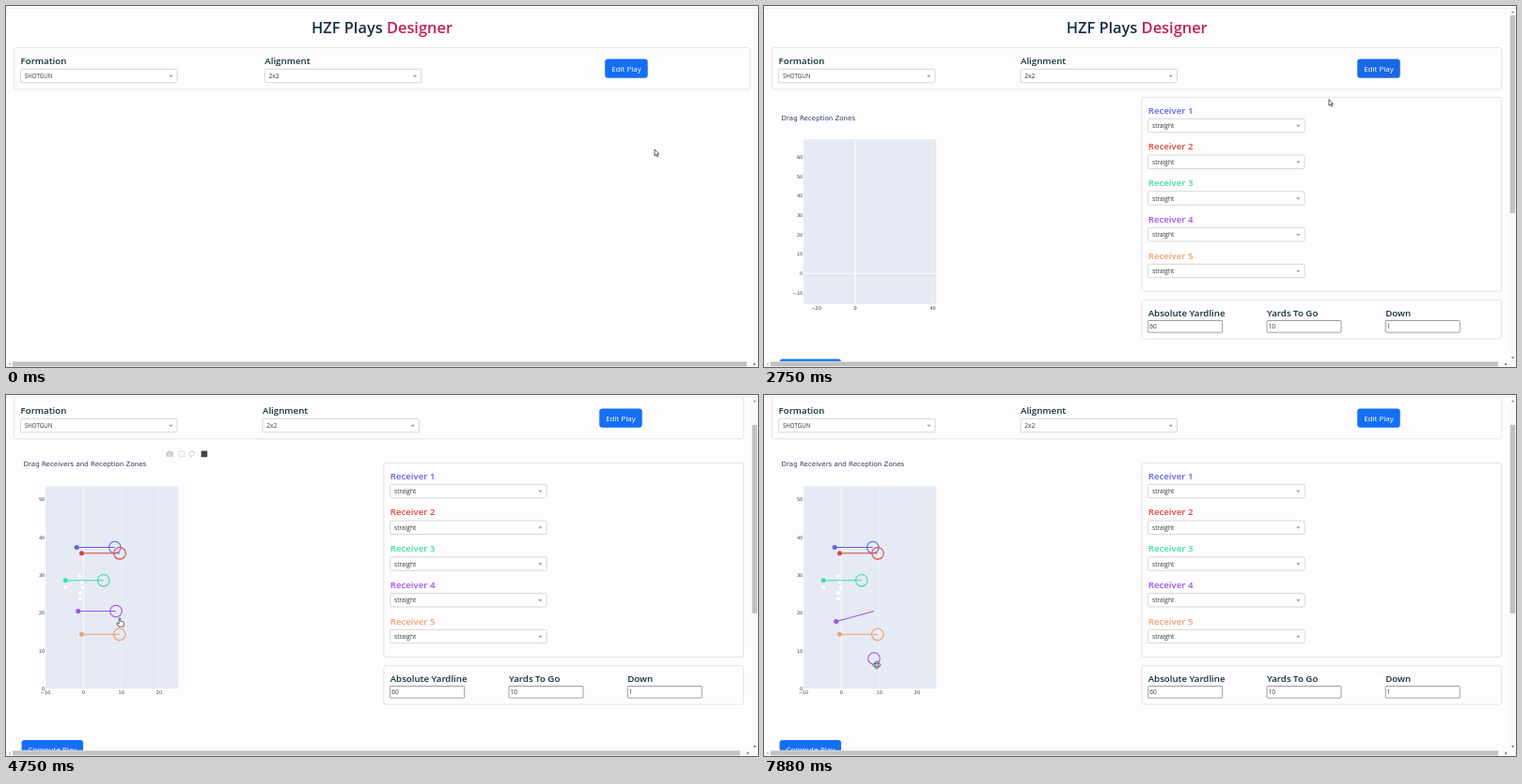
Animation, 800 px wide and 385 px high, one loop 8000 ms. Source, as an HTML page:

```html
<!DOCTYPE html>
<html lang="en">
<head>
<meta charset="utf-8">
<title>Plays Designer</title>
<style>
  html, body { margin: 0; width: 100%; height: 100%; overflow: hidden; background: #fefcfe; }
  svg { display: block; width: 800px; height: 385px; }
  text { font: 6.6px "Open Sans", "Noto Sans", sans-serif; fill: #333; }
  .title { font-size: 16.4px; font-weight: 600; fill: #14303f; text-anchor: middle; }
  .label { font-size: 9.7px; font-weight: 600; fill: #10303a; }
  .button { font-size: 8px; fill: #fff; text-anchor: middle; }
  .heading { font: 7.08px "DejaVu Sans", sans-serif; fill: #2a3f5f; }
  .tick { font: 5px "DejaVu Sans", sans-serif; fill: #2a3f5f; text-anchor: middle; }
  .end { text-anchor: end; }
</style>
</head>
<body>
<svg id="stage" viewBox="0 0 800 385"></svg>
<script>
const BLUE = '#156ff5', HOVER = '#1a5dc4';
const STEP = 125, LOOP = 8000;

// Receivers: colour, start x, y and route end x, in page coordinates
const receivers = [
  ['#6264dc', 75.2, 204.5, 115.8],
  ['#d8463f', 80.5, 210.8, 121],
  ['#3be0a0', 63.2, 239.8, 103.8],
  ['#9a52e8', 76.8, 272.5, 117],
  ['#f0a070', 80.5, 297.3, 120.8]
];
const linemen = [[78.5, 235.2], [80.5, 241], [63.2, 247], [81.5, 247.5], [79, 253], [79, 259.3]];

const text = (x, y, s, cls = '', style = '') => `<text x="${x}" y="${y}" class="${cls}" style="${style}">${s}</text>`;
const rect = (x, y, w, h, attrs) => `<rect x="${x}" y="${y}" width="${w}" height="${h}" ${attrs}/>`;
const line = (x1, y1, x2, y2, attrs) => `<path d="M${x1} ${y1}L${x2} ${y2}" ${attrs}/>`;
const path = (d, attrs) => `<path d="${d}" ${attrs}/>`;
const card = (x, y, w, h) => rect(x, y, w, h, 'rx="2.5" fill="none" stroke="#dfdde0" stroke-width=".8"');
const button = (x, y, w, s, cls) =>
  rect(x, y, w, 20.4, `rx="3.2" fill="${BLUE}" class="${cls}"`) + text(x + w / 2, y + 13.2, s, 'button');

const field = (x, y, label, value, color = '#10303a') =>
  text(x, y, label, 'label', `fill:${color}`) +
  rect(x, y + 5.8, 166.5, 14.4, 'rx="1.5" fill="#fff" stroke="#ccc" stroke-width=".8"') +
  text(x + 4.3, y + 15.5, value, '', `font-size:${value === 'SHOTGUN' ? 6.2 : 6.6}px`) +
  path(`M${x + 157.5} ${y + 12.2}h4.4l-2.2 2.2z`, 'fill="#999"');

const input = (x, label, value) =>
  text(x, 330.5, label, 'label') +
  rect(x, 335.5, 79, 12.6, 'rx=".8" fill="#fff" stroke="#767676" stroke-width=".7"') +
  text(x + 1.6, 344.4, value);

const header = (mid, width, alignX, buttonX) =>
  text(mid, 28.5, 'HZF Plays <tspan fill="#c01f52">Designer</tspan>', 'title') +
  card(8.5, 44.4, width, 44.4) +
  field(15.6, 61.5, 'Formation', 'SHOTGUN') + field(alignX, 61.5, 'Alignment', '2x2') +
  button(buttonX, 56.4, 45.5, 'Edit Play', 'edit');

const minus = n => String(n).replace('-', '\u2212');

// Plot area with ticks every `dx` and `dy`; (x0, y0) is the zero point and k the scale
function plot(top, bottom, x0, y0, k, xs, ys, heading, headingY) {
  const grid = x => line(x0 + x * k, top, x0 + x * k, bottom, `stroke="#fff" stroke-width="${x ? .5 : 1}" opacity="${x ? .6 : .9}"`);
  return text(18.5, headingY, heading, 'heading') +
    rect(42, top, 141.3, bottom - top, 'fill="#e5eaf5"') +
    xs.map(x => grid(x) + text(x0 + x * k, bottom + 6, minus(x), 'tick')).join('') +
    ys.map(y => text(41.3, y0 - y * k + 1.8, minus(y), 'tick end')).join('');
}

const emptyPlot = plot(142.4, 317.8, 97, 285.2, 2.065, [-20, 0, 40], [-10, 0, 10, 20, 30, 40, 50, 60],
  'Drag Reception Zones', 122) + line(42, 285.2, 183.3, 285.2, 'stroke="#fff" opacity=".8"');

const routes = receivers.map(([color, x, y, end], i) =>
  line(x, y, end, y, `id="route${i}" stroke="${color}" stroke-width="1.1"`) +
  `<circle id="start${i}" cx="${x}" cy="${y}" r="2.5" fill="${color}"/>` +
  `<circle id="zone${i}" cx="${end}" cy="${y}" r="6.3" fill="none" stroke="${color}" stroke-width="1.1"/>`).join('');

const toolbar = `<g id="toolbar" fill="none" stroke="#c4c5c9" stroke-width=".9">` +
  path('M170.6 102.8h1.8l.8-1.2h2l.8 1.2h1.8v5h-7.2z', 'fill="#c4c5c9" stroke="none"') +
  '<circle cx="174.2" cy="105.2" r="1.4" stroke="#fefcfe" stroke-width=".7"/>' +
  rect(184.2, 102, 5.6, 5.6, 'stroke-dasharray="1.3 .8"') +
  path('M195.2 106.4c-1.4-2 .2-4.4 2.6-4.4s3.4 2 2.2 3.8-3 1.8-4.2.8l.2 1.8', '') +
  rect(207.6, 101.6, 6.6, 6.6, 'fill="#444" stroke="none"') + '</g>';

const fullPlot = plot(139.2, 355.2, 82.3, 355.2, 4.035, [-10, 0, 10, 20], [0, 10, 20, 30, 40, 50],
  'Drag Receivers and Reception Zones', 118.4) +
  linemen.map(([x, y]) => `<circle cx="${x}" cy="${y}" r="2" fill="#fff"/>`).join('') + routes + toolbar;

const side = card(401.8, 97.4, 382.8, 207.2) +
  receivers.map(([color], i) => field(408.7, 114.5 + 38.75 * i, `Receiver ${i + 1}`, 'straight', color)).join('') +
  card(401.8, 313.6, 382.8, 41.4) +
  input(408.7, 'Absolute Yardline', 60) + input(535, 'Yards To Go', 10) + input(661.2, 'Down', 1);

const outline = 'fill="#fff" stroke="#222" stroke-width=".7" stroke-linejoin="round"';
const cursors = {
  arrow: path('M0 0V6.8L1.6 5.4L2.7 7.8L3.7 7.3L2.6 5H4.6z', outline),
  hand: path('M-.8 .7Q0-.5 .8 .7V3.8L4 4.6Q4.8 5 4.6 6L3.8 9.6H-1L-3.2 6.2Q-2.6 5-.8 6.4z', outline),
  move: path('M0-4.4L1.8-2.4H.8V-.8H2.4V-1.8L4.4 0L2.4 1.8V.8H.8V2.4H1.8L0 4.4L-1.8 2.4H-.8V.8H-2.4V1.8L-4.4 0L-2.4-1.8V-.8H-.8V-2.4H-1.8z', outline)
};

const stage = document.getElementById('stage');
stage.innerHTML =
  rect(0, 0, 800, 385, 'fill="#fefcfe"') +
  `<g id="page"><g id="before">${header(400, 783, 275.3, 637.2)}</g>
   <g id="after">${header(396.7, 776.2, 273, 631.2)}
     <g id="side">${side}</g><g id="empty">${emptyPlot}</g><g id="full">${fullPlot}</g>
     <g id="compute">${button(16.6, 410, 65.5, 'Compute Play', '')}</g></g></g>` +
  rect(0, 0, 800, 2, 'fill="#fff"') + rect(0, 2, 800, .8, 'fill="#ebe9ec"') +
  rect(0, 378.8, 800, 6.2, 'fill="#fbf9fb"') +
  path('M4.6 380.6v3l-1.8-1.5z', 'fill="#aaa"') +
  rect(7, 379.4, 781, 5, 'id="across" fill="#c1c1c1"') +
  path('M0 380.6v3l1.8-1.5z', 'id="right" fill="#444"') +
  '<g id="vertical">' + rect(793, 2.8, 7, 376, 'fill="#fbf9fb"') +
  path('M795 7.2h3l-1.5-1.8z', 'fill="#777"') + path('M795 374.2h3l-1.5 1.8z', 'fill="#444"') +
  rect(793.7, 10, 5.4, 201, 'id="down" fill="#c1c1c1"') + '</g>' +
  '<g id="cursor">' + Object.entries(cursors).map(([k, d]) => `<g id="${k}">${d}</g>`).join('') + '</g>';

const el = id => document.getElementById(id);
const set = (id, name, value) => el(id).setAttribute(name, value);
const show = (id, on) => set(id, 'display', on ? 'inline' : 'none');
const shift = (id, x, y) => set(id, 'transform', `translate(${x} ${y})`);

// Linear interpolation over [time, value...] keys
function track(keys, t) {
  const i = keys.findIndex(k => k[0] > t);
  if (i === 0) return keys[0].slice(1);
  if (i < 0) return keys[keys.length - 1].slice(1);
  const a = keys[i - 1], b = keys[i], u = (t - a[0]) / (b[0] - a[0]);
  return a.slice(1).map((v, n) => v + (b[n + 1] - v) * u);
}

const pointer = [
  [0, 690, 153], [375, 672, 205], [875, 655, 150], [1000, 655, 114], [1750, 666, 84], [1875, 664.5, 68.5],
  [2500, 664.5, 68.5], [2750, 601, 99.5], [3375, 271.5, 160.5], [3875, 172, 247.5], [4250, 160, 245],
  [5250, 82, 230], [5500, 82, 232], [5625, 82, 241], [6000, 82, 252], [6250, 82, 252],
  [6750, 120, 237.5], [7000, 120, 237.5], [7875, 120, 288]
];
const scrolling = [[3250, 0], [3375, 15], [3500, 42]];
const startDrag = [[5625, 272.5], [6000, 283.5]];
const zoneDrag = [[7000, 272.5], [7875, 323]];
const toolbarFade = [[3375, 0], [3675, 1], [5375, 1], [5675, 0], [6125, 0], [6425, 1], [7000, 1], [7300, 0]];

function cursorAt(t) {
  if (t < 1875) return 'arrow';
  if (t < 2625) return 'hand';
  if (t < 3625) return 'arrow';
  if (t < 5250 || (t >= 6375 && t < 6750)) return 'hand';
  return 'move';
}

function draw(t) {
  const open = t >= 2625, loaded = t >= 3000;
  const [scroll] = track(scrolling, t), [startY] = track(startDrag, t);

  show('before', !open);
  show('after', open);
  show('vertical', open);
  show('empty', !loaded);
  show('full', loaded);
  shift('page', 0, -scroll);
  shift('side', 0, loaded ? 17 : 0);
  shift('compute', 0, loaded ? 0 : -33.5);
  set('across', 'width', open ? 774 : 781);
  shift('right', open ? 788.5 : 795.5, 0);
  set('down', 'y', 10 + scroll * .52);
  set('down', 'height', loaded ? 201 : 211);

  const fill = t < 1875 || t >= 2875 ? BLUE : t < 2625 ? HOVER : '#1a68e8';
  document.querySelectorAll('.edit').forEach(e => e.setAttribute('fill', fill));

  set('start3', 'cy', startY);
  set('route3', 'd', `M76.8 ${t < 6125 ? 272.5 : startY}L117 272.5`);
  set('zone3', 'cy', track(zoneDrag, t)[0]);
  set('toolbar', 'opacity', track(toolbarFade, t)[0]);

  const kind = cursorAt(t);
  Object.keys(cursors).forEach(k => show(k, k === kind));
  shift('cursor', ...track(pointer, t));
}

function frame() {
  draw(Math.floor(performance.now() % LOOP / STEP) * STEP);
  requestAnimationFrame(frame);
}
frame();
</script>
</body>
</html>
```
